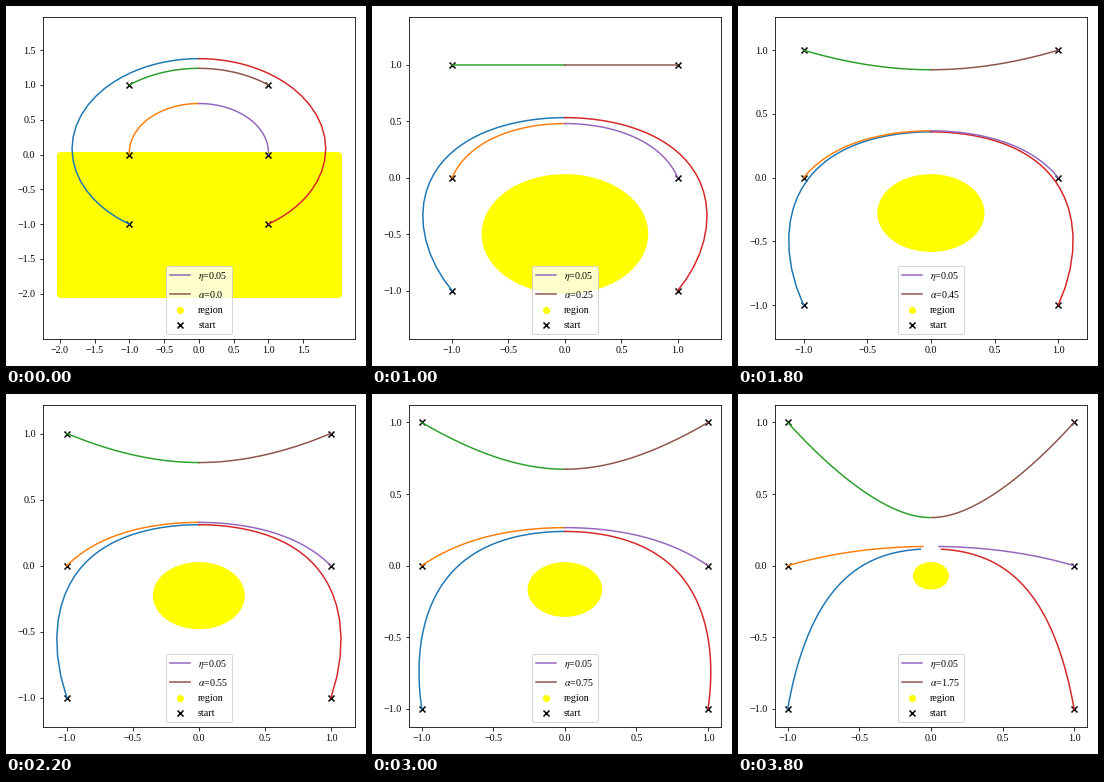
These frames come from a looping animation (360x360 px, 4000 ms). A matplotlib script:

```python
import numpy as np
import matplotlib.pyplot as plt
from matplotlib.animation import FuncAnimation
from matplotlib.patches import Polygon
from matplotlib.ticker import FixedLocator

SIZE, DPI = 360, 72
FRAMES, INTERVAL = 20, 200
ETA, STEPS = 0.05, 700
LEFT, RIGHT, BOTTOM, TOP = 36.6, 349.2, 27.45, 349.3
MARK = 3  # marker radius in px
STARTS = [(x, y) for x in (-1, 1) for y in (-1, 0, 1)]
TICKS = np.arange(-2, 2, 0.5)
ALPHAS = [0.05 * k for k in range(15)] + [0.75 + 0.25 * k for k in range(5)]

plt.rcParams.update({
    "font.family": "Liberation Serif",
    "font.size": 10,
    "mathtext.fontset": "stix",
})

fig = plt.figure(figsize=(SIZE / DPI, SIZE / DPI), dpi=DPI)
ax = fig.add_axes([LEFT / SIZE, BOTTOM / SIZE,
                   (RIGHT - LEFT) / SIZE, (TOP - BOTTOM) / SIZE])


def descend(x, y, alpha):
    """Adjusted gradient play on the game f(x, y) = x^2 y."""
    # strong adjustment needs finer steps
    step = ETA if alpha < 0.75 else 0.015 / alpha
    path = [(x, y)]
    for _ in range(STEPS):
        dx = 2 * x * y + 2 * alpha * x**3
        dy = -x**2 + 4 * alpha * x**2 * y
        x, y = x - step * dx, y - step * dy
        path.append((x, y))
    return np.array(path)


def region(alpha):
    """Outline of y + 2 alpha (x^2 + 2 y^2) <= 0 inside [-2, 2] x [-2, 0]."""
    depth = min(2, 1 / (4 * alpha)) if alpha else 2
    y = -depth * (1 - np.cos(np.linspace(0, np.pi, 200))) / 2
    if alpha:
        half = np.sqrt(np.maximum(-y / (2 * alpha) - 2 * y**2, 0))
    else:
        half = np.full_like(y, 2)
    half = np.minimum(half, 2)
    return np.vstack([np.column_stack([half, y]),
                      np.column_stack([-half, y])[::-1]])


def fit_limits(paths, marked):
    """Let the data limits include the marker extents."""
    points = np.vstack(paths + [marked])
    box = np.array([RIGHT - LEFT, TOP - BOTTOM])
    scale = ((box / 1.1 - 2 * MARK) / np.ptp(points, axis=0)).min()
    pad = MARK / scale
    ax.update_datalim([marked.min(axis=0) - pad, marked.max(axis=0) + pad])
    ax.set_aspect("equal", adjustable="datalim")
    ax.autoscale_view()


def draw(i):
    ax.clear()
    alpha = ALPHAS[i]
    paths = [descend(x, y, alpha) for x, y in STARTS]
    outline = region(alpha)

    lines = [ax.plot(*p.T)[0] for p in paths]
    lines[4].set_label(rf"$\eta$={ETA}")
    lines[5].set_label(rf"$\alpha$={str(alpha)[:5]}")

    ax.add_patch(Polygon(outline, facecolor="yellow", edgecolor="yellow",
                         linewidth=2 * MARK + 1, joinstyle="round", zorder=0.9))
    dot = ax.scatter([], [], color="yellow", label="region")
    cross = ax.scatter(*np.transpose(STARTS), color="black", marker="x",
                       label="start")

    fit_limits(paths, np.vstack([outline, STARTS]))
    for axis in (ax.xaxis, ax.yaxis):
        axis.set_major_locator(FixedLocator(TICKS))
    ax.legend(handles=[lines[4], lines[5], dot, cross], loc="lower center",
              labelspacing=0.6)
    return []


anim = FuncAnimation(fig, draw, frames=FRAMES, interval=INTERVAL,
                     init_func=lambda: [], repeat=True, repeat_delay=0)
plt.show()
```
